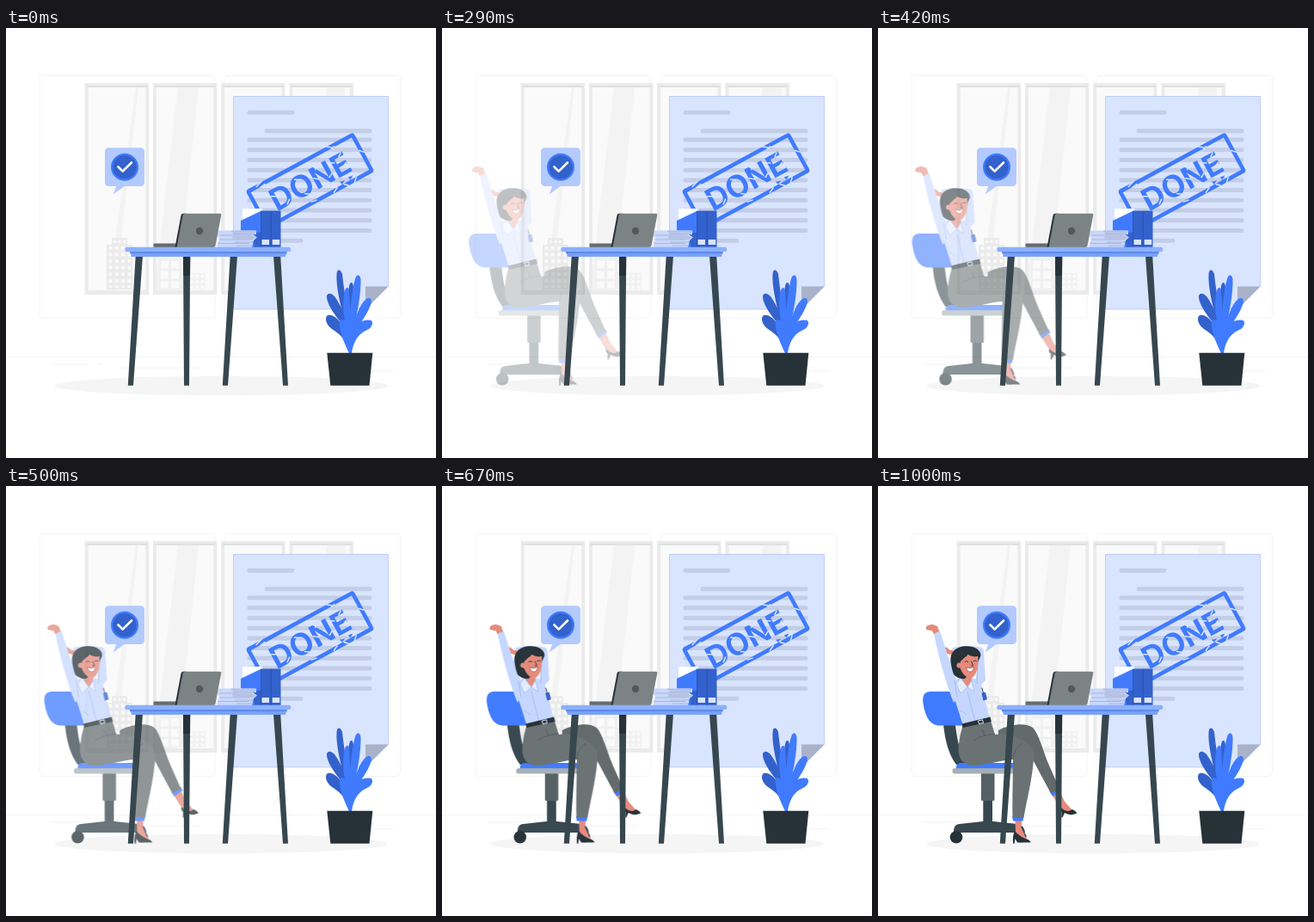
These frames come from a looping animation (500x500 px, 1040 ms). An HTML page:

```html
<!DOCTYPE html>
<html lang="en">
<head>
<meta charset="utf-8">
<title>Done</title>
<style>
  html, body { margin: 0; width: 100%; height: 100%; overflow: hidden; background: #fff; }
  svg { display: block; width: 100vw; height: 100vh; }
  .blue { fill: #407bff; }
  .navy { fill: #3362cc; }
  .dark { fill: #263238; }
  .slate { fill: #37474f; }
  .skin { fill: #e58a7b; }
  .shirt { fill: #c6d7ff; }
  .fold { fill: none; stroke: #9db6ee; stroke-width: .8; }
  .ink { fill: none; stroke: #263238; stroke-width: .9; stroke-linecap: round; }
  .stamp text { font: 700 35.5px Inter, "Open Sans", sans-serif; text-anchor: middle; fill: #407bff; }
  .worker { animation: slide 1.04s infinite; }
  .gate { animation: gate 1.04s step-end infinite; }
  /* one second of overshooting entrance, then a short rest */
  @keyframes slide {
    0% { opacity: 0; transform: translateX(-30px); animation-timing-function: cubic-bezier(.36, -.01, .5, 1.38); }
    96.15%, 100% { opacity: 1; transform: none; }
  }
  @keyframes gate {
    0% { visibility: hidden; }
    12.4%, 100% { visibility: visible; }
  }
</style>
</head>
<body>
<svg viewBox="0 0 500 500">
  <defs>
    <pattern id="lights" x="118" y="252" width="7.3" height="7.6" patternUnits="userSpaceOnUse">
      <rect x="1.5" y="2" width="4" height="4" rx="1" fill="#fafafa"/>
    </pattern>
    <pattern id="small" x="206" y="285" width="6.4" height="6.4" patternUnits="userSpaceOnUse">
      <rect x="1.4" y="1.5" width="4" height="4" fill="#fafafa"/>
    </pattern>
    <g id="pane">
      <path fill="#ebebeb" d="M0 0H74.5V246H0Z"/>
      <path fill="#e0e0e0" d="M2 3H72.5V5H2Z"/>
      <path fill="#fafafa" d="M4 5H70.5V241H4Z"/>
    </g>
  </defs>

  <!-- room -->
  <g fill="none" stroke="#ebebeb" stroke-width=".6">
    <rect x="39" y="55.2" width="204" height="282.4" rx="5"/>
    <rect x="254" y="55.2" width="204.5" height="282.4" rx="5"/>
    <path d="M0 382.4H500M417 398.6h33M322.5 401.3h8.7M396.6 389.3h19.2M52.5 391h43.2M104.6 391h6.3M131.5 395.2h93.7"/>
  </g>
  <use href="#pane" x="91.7" y="64"/>
  <use href="#pane" x="170.9" y="64"/>
  <use href="#pane" x="250.1" y="64"/>
  <use href="#pane" x="329.4" y="64"/>
  <g fill="#f3f3f3">
    <path d="M151 69h3L127 305h-8ZM200 69h24L199 305H175V282ZM373 69h22l-1 12H371Z"/>
  </g>
  <path fill="#ebebeb" d="M123 244H141V252H147V304H117V252H123Z"/>
  <path fill="url(#lights)" d="M118 252H146V302H118Z"/>
  <path fill="#fafafa" d="M125 247h3v3h-3zM130.500 247h3v3h-3zM136 247h3v3h-3z"/>
  <path fill="#f0f0f0" d="M178 268H204V304H178ZM204 285H232V304H204Z"/>
  <path fill="#fafafa" d="M180 270.500h9v9h-9zm12 0h9v9h-9zm-12 12h9v9h-9zm12 0h9v9h-9zm-12 12h9v8h-9zm12 0h9v8h-9z"/>
  <path fill="url(#small)" d="M206 285H232V304H206Z"/>
  <ellipse cx="250" cy="416" rx="194" ry="11.300" fill="#f5f5f5"/>

  <!-- document -->
  <path fill="#d9e4ff" stroke="#a9c0f8" stroke-width=".7" d="M264.500 79.500H444.500V300.500L418 327H264.500Z"/>
  <path fill="#a9b2c9" d="M418 300.500H444.500L418 327Z"/>
  <path stroke="#c3cde6" stroke-width="5" stroke-linecap="round" d="M283 98.300H333M303 119.700H423M283 130H423M283 141.700H423M283 153.500H423M283 165.200H423M283 176.900H423M283 188.600H423M283 200.300H423M283 212H423M283 223.800H423M283 235.600H423M283 247.300H343"/>
  <g class="stamp" transform="translate(353.500 178) rotate(-28.500)">
    <rect x="-69" y="-23.700" width="138" height="47.400" rx="1.500" fill="none" stroke="#407bff" stroke-width="4.600"/>
    <text y="13">DONE</text>
    <g fill="none" stroke="#d9e4ff" stroke-width="1.500" stroke-linecap="round">
      <path d="M-58 -24l8 -2.500M-54 -21l6 -1M36 -26l5 4M40 -21l4 -1M67 -4l4 4M18 25l6 -3M33 22l4 4M45 26l4 -4M-10 22l6 1"/>
      <path d="M-48 -6l7 4M-36 11l5 -4M-15 -10l5 3M-12 10l6 4M5 -1l5 4M12 -9l4 -3M22 7l5 -3M30 -8l5 3M41 4l6 -3M43 -9l4 -3"/>
    </g>
    <path class="blue" d="M30 17l6 2-5 2zM41 17l6 1-5 3z"/>
  </g>

  <!-- speech bubble -->
  <rect x="115" y="139.300" width="46" height="44.700" rx="4.500" fill="#b3caff"/>
  <path fill="#b3caff" d="M128.500 183L124.700 193.500L139 183Z"/>
  <circle class="blue" cx="138" cy="161.700" r="16"/>
  <circle class="navy" cx="138" cy="161.700" r="13.800"/>
  <path fill="none" stroke="#fff" stroke-width="2.600" stroke-linecap="round" stroke-linejoin="round" d="M130.500 161.500L135.700 166.700L146 156.500"/>

  <g class="gate"><g class="worker">
    <!-- chair -->
    <path class="slate" d="M76 277H90C92 298 96 312 104 324H91C82 312 78 296 76 277Z"/>
    <path class="blue" d="M61 239H92L100 278.500H72C60 278.500 55 268 52.500 253C51 244 54 239 61 239Z"/>
    <path class="slate" d="M122.300 364H133V392H122.300Z"/>
    <path fill="#566166" d="M120 333H135.500V364.500Q135.500 366 134 366H121.500Q120 366 120 364.500Z"/>
    <path class="slate" d="M88 403C88 396 90 393.500 95 393L122 390H134L162 393Q170 394 171 403Z"/>
    <circle class="dark" cx="91" cy="408.300" r="7.300"/>
    <circle class="dark" cx="166" cy="408" r="6.500"/>
    <path class="blue" d="M91 329Q90 322 97 322H160V329Z"/>
    <rect x="86.500" y="328.300" width="74" height="6.300" rx="2.500" fill="#a6b0b4"/>

    <!-- raised arms -->
    <path class="skin" d="M88 197L79 194.500L76.500 190L79 187L84 191L90 190Z"/>
    <path class="shirt" d="M86 188Q104 184 119 187.500Q123 188 123 193L125 226L113 238L116 196L88 197Z"/>
    <path class="skin" d="M65 172.500L63 168.500L56 167Q55 164 58 162L63 160.800L69 163L71.500 170Z"/>
    <path class="shirt" d="M65 172L72 168.500C77 184 83 203 91 224L98 238L88 252C80 232 71 202 65 172Z"/>

    <!-- body -->
    <path class="shirt" d="M84 232Q90 224 97 223L109 223Q117 224 120 231C123 243 126 256 130.500 271L99 279C94 262 88 245 84 232Z"/>
    <path class="fold" d="M89 226L92 246M116 203L115 230M104 239L113 274M96 261L103 266"/>
    <path class="skin" d="M97 215H108L109 228L105 235L96 225Z"/>
    <path fill="#e4edff" stroke="#9db6ee" stroke-width=".7" d="M96 223L91 230L96 241L104 234ZM109 226L104 234L112 239Z"/>
    <path class="navy" d="M120.500 241l4.500 -1.200 2 8.500 -4.500 1.300z"/>
    <path class="ink" stroke="#3362cc" d="M122.500 241L121 235"/>

    <!-- head -->
    <path class="dark" d="M84.500 205C83 193 91 186.300 103 186.300C113 186.300 119.500 191 119.500 197L115 208L101 224Q93 225 88 219Q86 214 84.500 205Z"/>
    <path class="skin" d="M96 204Q101 200 103 195C109 199 113 198 116 196.500C117.500 207 115.500 220 109 223C102 224 97 217 95 210Z"/>
    <circle class="skin" cx="94.500" cy="208.500" r="3"/>
    <path class="dark" d="M90 198Q103 203 105 194Q111 201 118 197L113 190L97 190Z"/>
    <path class="ink" d="M101 204.500Q103 202.500 105 204.500M111 203.500Q113 202 114.500 203.500"/>
    <path class="ink" stroke-width=".6" d="M108.500 204L110.500 209H108.500"/>
    <path fill="#fff" stroke="#8d3f3a" stroke-width=".6" d="M102 211Q107 213 111.500 210.500Q110.500 216 107 216Q104 216 102 211Z"/>

    <!-- far leg -->
    <path class="skin" d="M203 360L211.500 355L217 367L226 377L221 380L213 376Z"/>
    <path class="dark" d="M212 373Q216 378 222 378L226 376Q230 377.500 231.500 380.500Q223 384 217 380L214.500 385.500H213.300L213.500 379Q210 376 212 373Z"/>
    <path class="blue" d="M199.500 355L211 350L213 354L203 361Z"/>
    <path fill="#626a6c" d="M140 284C155 276 173 275 180 281C187 288 191 306 199 325L211 352L201 357.500C190 337 181 320 174 307L140 305Z"/>

    <!-- near leg -->
    <path class="skin" d="M159.500 388H167.500L166.500 397L173 411H163L160 404Z"/>
    <path class="dark" d="M159 401Q164 407 171 410Q177 411.500 177.500 414.500H162L159.500 410L158.500 416H157.300Q156 407 159 401Z"/>
    <path class="blue" d="M156 384H169.500L168.500 389.500H157Z"/>
    <path fill="#6a7274" d="M98 280L131 273L136 289C147 287 160 290 171 298C180 303 182 308 181 318C179 343 173 365 169.500 385.500H156.500C156 362 157 338 157 318C140 319 122 326 108 325C96 323 92 313 94 300Q95 290 98 280Z"/>
    <path fill="none" stroke="#535b5d" stroke-width=".9" d="M136 288C125 290 118 291 111 296M157 318Q158 305 168 299M121 283L124 290"/>
    <path class="dark" d="M97.500 276.500L130.500 268.500L131.800 274L98.500 281Z"/>
    <path fill="none" stroke="#dfe6f6" stroke-width="1" d="M116.500 273l5 -1.200 1 3.700 -5 1.200z"/>
  </g></g>

  <!-- binders and papers -->
  <path fill="#fff" d="M275 210H298V222H275Z"/>
  <path class="blue" d="M273 224L297 212.500V255H273Z"/>
  <path class="navy" d="M296.500 212.500H319.500V255H289V250H286V241H290V238H296.500Z"/>
  <path stroke="#2a4fa8" stroke-width=".8" d="M308.200 213V255M296.500 213V255"/>
  <path fill="#d9e4ff" d="M297.500 246h8.500v6h-8.500zM309.700 246h8.500v6h-8.500z"/>
  <path fill="#c9d7fb" d="M247 235.500H291V240H287L292 243.500L288 247L286 255H246V249L249 246L245 241Z"/>
  <path fill="none" stroke="#aab7d9" stroke-width="1" d="M262 236.500H290M264 239.500H289M248 241H286M263 244H290M247 246H284M266 249H287M247 250.500H283M268 253H286"/>
  <path fill="#b5c2e3" d="M262 235.500H289L290 238.500H264ZM263 242H288V246H266Z"/>

  <!-- laptop -->
  <rect x="171.500" y="250.500" width="70" height="4.700" rx="1" fill="#666c6e"/>
  <path class="dark" d="M206 215.800H210L202 255H196.500L203.500 218Q204 215.800 206 215.800Z"/>
  <path fill="#7c8385" d="M208 215.800H249Q250.700 215.800 250.300 217.500L243.500 253Q243 255 241 255H198.500L205.500 218Q206 215.800 208 215.800Z"/>
  <circle cx="225" cy="236" r="4.200" fill="#50585b"/>

  <!-- table -->
  <g class="slate">
    <path d="M150.700 265H159L148 415.800H141.800ZM206 265H214.200L213 415.800H207ZM260.700 265H269L258 415.800H251.800ZM311 265H319.200L328 415.800H322Z"/>
  </g>
  <path class="dark" d="M206 266H214.200L214 288H206.200Z"/>
  <path fill="#7aa2fa" d="M144 259H326.500L325 266H146Z"/>
  <path fill="#5f8be8" d="M143.500 259H327L326.500 262.300H144.200Z"/>
  <rect x="138.300" y="254.800" width="193" height="5.200" rx="2.600" fill="#8cb0ff"/>

  <!-- plant -->
  <g class="navy">
    <path d="M398 352C391 333 382 297 385 283Q388 279 391 286C393 305 397 330 402 352Z"/>
    <path d="M396 350C387 340 372 322 373 311Q376 306 382 312C391 325 396 338 399 350Z"/>
    <path d="M399 378C397 363 388 356 379 350C372 345 370 337 374 334C383 331 397 347 402 378Z"/>
    <path d="M398 345C397 325 397 304 400 297Q403 294 404 301C405 316 403 332 402 346Z"/>
  </g>
  <g class="blue">
    <path d="M399 350C400 327 403 298 407 289Q411 285 412.500 292C413 310 408 333 404 352Z"/>
    <path d="M397 352C391 335 391 310 395 303Q398 300 399 306C400 322 401 337 403 352Z"/>
    <path d="M402 352C406 337 411 321 419 315Q425 312 425 319C421 332 412 343 405 354Z"/>
    <path d="M399 378C392 364 386 348 388 340Q394 337 399 347L403 348C408 342 418 338 425 340Q428 345 422 350C411 355 405 361 402 378Z"/>
  </g>
  <path class="dark" d="M373.300 377.700H426.300L422.500 415.800H377.300Z"/>
</svg>
</body>
</html>
```
